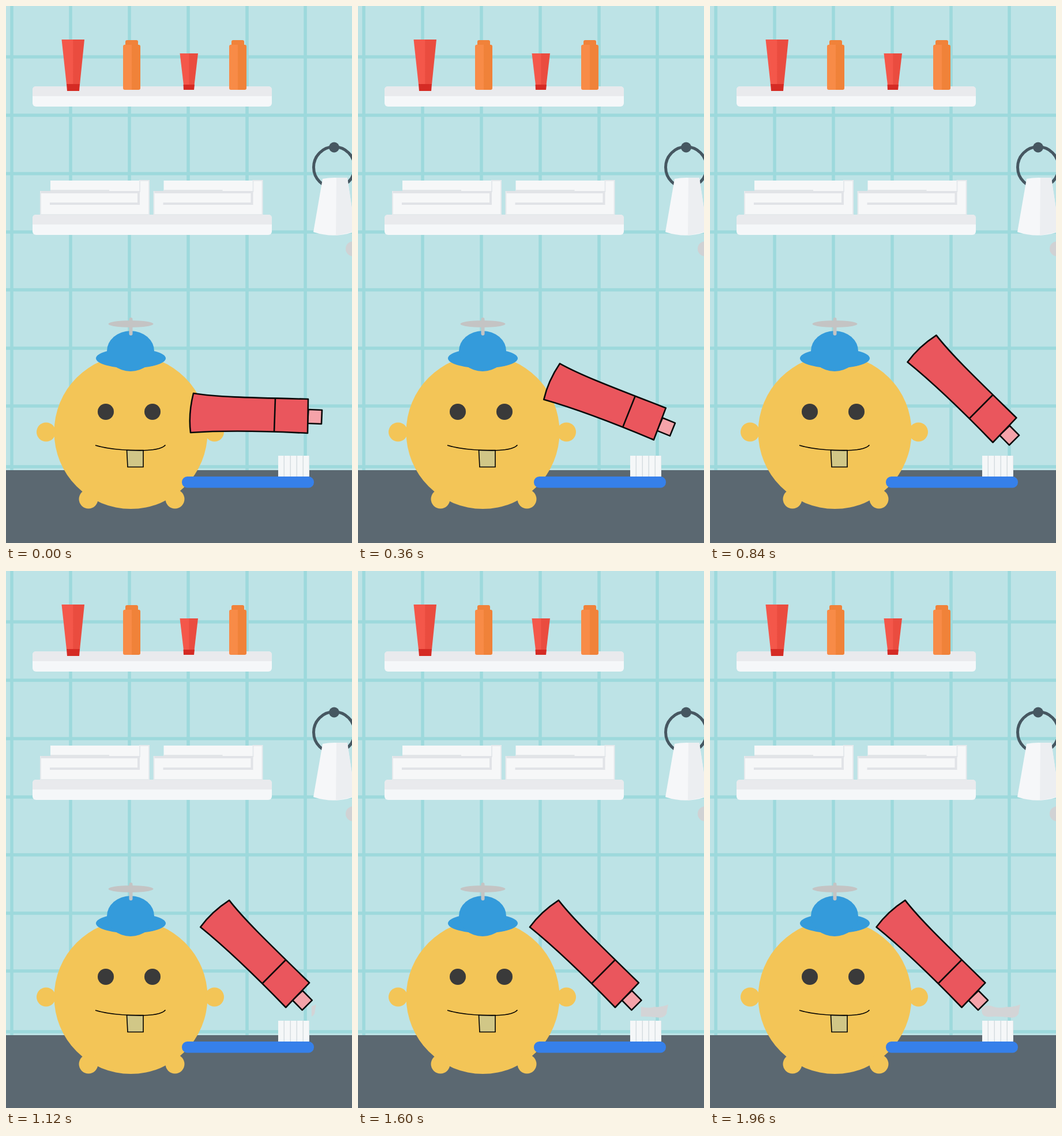
Animation, 600 px wide and 929 px high, one loop 2000 ms. Source, as an HTML page:

```html
<!DOCTYPE html>
<html lang="en">
<head>
<meta charset="utf-8">
<title>Brushing time</title>
<style>
  html, body { margin: 0; width: 100%; height: 100%; overflow: hidden; background: #bde3e6; }
  svg { display: block; width: 100vw; height: 100vh; }
</style>
</head>
<body>
<svg viewBox="0 0 600 929">
  <defs>
    <linearGradient id="red">
      <stop offset=".48" stop-color="#f4574a"/><stop offset=".52" stop-color="#ea4c3f"/>
    </linearGradient>
    <linearGradient id="orange">
      <stop offset=".48" stop-color="#f88b47"/><stop offset=".52" stop-color="#f08239"/>
    </linearGradient>
    <g id="shelf">
      <rect x="46" width="415" height="35" rx="6" fill="#f5f7f9"/>
      <path d="M46 17V6q0-6 6-6h403q6 0 6 6v11z" fill="#e9eaed"/>
    </g>
    <g id="bottle">
      <rect x="4" width="22" height="14" rx="3" fill="#f0823a"/>
      <rect y="8" width="30" height="78" rx="3" fill="url(#orange)"/>
    </g>
    <g id="towels">
      <path d="M77 302h171v18H77z" fill="#f6f7f8"/>
      <path d="M77 319h102" stroke="#e2e5e8" stroke-width="2"/>
      <path d="M60 321h172v-19h16v59H60z" fill="#f6f7f8" stroke="#e5e9ec" stroke-width="2"/>
      <path d="M61 322h169v20H76" fill="none" stroke="#e1e3e7" stroke-width="4"/>
    </g>
    <clipPath id="reveal"><rect id="wipe" x="540" y="740" width="80" height="40"/></clipPath>
  </defs>

  <rect width="600" height="929" fill="#bde3e6"/>
  <g id="grid" fill="none" stroke="#9dd9dc" stroke-width="5.5"></g>
  <rect y="803" width="600" height="126" fill="#5b6871"/>

  <use href="#shelf" y="139"/>
  <use href="#shelf" y="361"/>
  <path d="M96.500 58H136L128 136H105z" fill="url(#red)"/>
  <path d="M105 135h23l-1 12h-21z" fill="#d52b24"/>
  <path d="M301.500 82H333L326.500 137H308z" fill="url(#red)"/>
  <path d="M307.500 136h19.500l-1 9h-18z" fill="#d52b24"/>
  <use href="#bottle" x="203" y="59"/>
  <use href="#bottle" x="387" y="59"/>
  <use href="#towels"/>
  <use href="#towels" x="196.500"/>

  <circle cx="569" cy="279" r="35.500" fill="none" stroke="#465761" stroke-width="5"/>
  <circle cx="569" cy="244.500" r="9" fill="#465761"/>
  <path d="M549 299q20-4 43 0L606 390q-36 13-73 1z" fill="#f6f7f9"/>
  <path d="M573 297h19L606 390l-34 7z" fill="#eceef1"/>
  <ellipse cx="602" cy="420" rx="13" ry="13" fill="#d0d2d4"/>

  <g fill="#f3c557">
    <circle cx="216.500" cy="737" r="133"/>
    <circle cx="69.500" cy="737" r="16.500"/>
    <circle cx="361.500" cy="737" r="16.500"/>
    <circle cx="143" cy="853" r="16.500"/>
    <circle cx="293" cy="853" r="16.500"/>
  </g>
  <g fill="#349bdb">
    <ellipse cx="216.500" cy="609.500" rx="60.500" ry="17"/>
    <ellipse cx="216" cy="597" rx="41" ry="35"/>
  </g>
  <g fill="#c4c4c4">
    <ellipse cx="216.500" cy="550" rx="39" ry="6"/>
    <rect x="213.500" y="539" width="6" height="31" rx="3"/>
  </g>
  <g fill="#3a3a3a">
    <circle cx="173" cy="702" r="14"/>
    <circle cx="254" cy="702" r="14"/>
  </g>
  <g stroke="#000" stroke-width="1.600">
    <path d="M209.500 768.500H238V797.500H211z" fill="#d1c787"/>
    <path d="M155 760Q178 767 216 768.500C248 770 270 767 276.500 759.500" fill="none"/>
  </g>

  <rect x="305" y="814" width="229" height="19.500" rx="9.500" fill="#3680ea"/>
  <path d="M472 796H526" stroke="#d5dde0" stroke-width="36"/>
  <g id="bristles" fill="#f5f7f8"></g>

  <path clip-path="url(#reveal)" fill="#d3d4d6"
    d="M472 755Q482 749 492 754Q504 757 514 754Q526 755 538 750Q536 758 535 766Q530 775 517 772Q500 770 486 771Q468 773 472 755z"/>

  <g id="tube" stroke="#0a0a0a" stroke-width="2.600" stroke-linejoin="round">
    <path d="M89.500-9.500L113-8.500L112 15.500L88 14.500z" fill="#f5a3a9"/>
    <path d="M-110-37.500C-70-31 -20-30 89-27.500L88 31.500C20 28 -50 26-115 30.500Q-119-2-110-37.500z" fill="#ea565d"/>
    <path d="M32-29L30 29.500"/>
  </g>
</svg>
<script>
  const LOOP = 2000, STEP = 40;
  const $ = id => document.getElementById(id);

  const columns = [10, 112, 214, 316, 418, 519];
  const rows = [88, 189, 290, 391, 491, 592, 692, 797];
  $('grid').innerHTML = `<path d="${
    columns.map(x => `M${x} 0V803`).join('') + rows.map(y => `M0 ${y}H600`).join('')}"/>`;
  $('bristles').innerHTML = Array.from({ length: 5 }, (_, i) =>
    `<rect x="${472 + i * 11}" y="778" width="9.5" height="36"/>`).join('');

  // Progress from 0 to 1 between two times.
  const ramp = (t, from, to) => Math.min(1, Math.max(0, (t - from) / (to - from)));

  function draw(t) {
    const tilt = ramp(t, 80, 686);
    const slide = ramp(t, 1055, 1715);
    const x = 435 + 12.5 * tilt - 54 * slide;
    const y = 707.5 - 35.5 * tilt;
    $('tube').setAttribute('transform', `translate(${x} ${y}) rotate(${42.9 * tilt})`);
    $('wipe').setAttribute('x', 538 - 67 * ramp(t, 1020, 1840));
  }

  const start = performance.now();
  function tick() {
    const t = (performance.now() - start) % LOOP;
    draw(Math.floor(t / STEP) * STEP);
    requestAnimationFrame(tick);
  }
  draw(0);
  tick();
</script>
</body>
</html>
```
